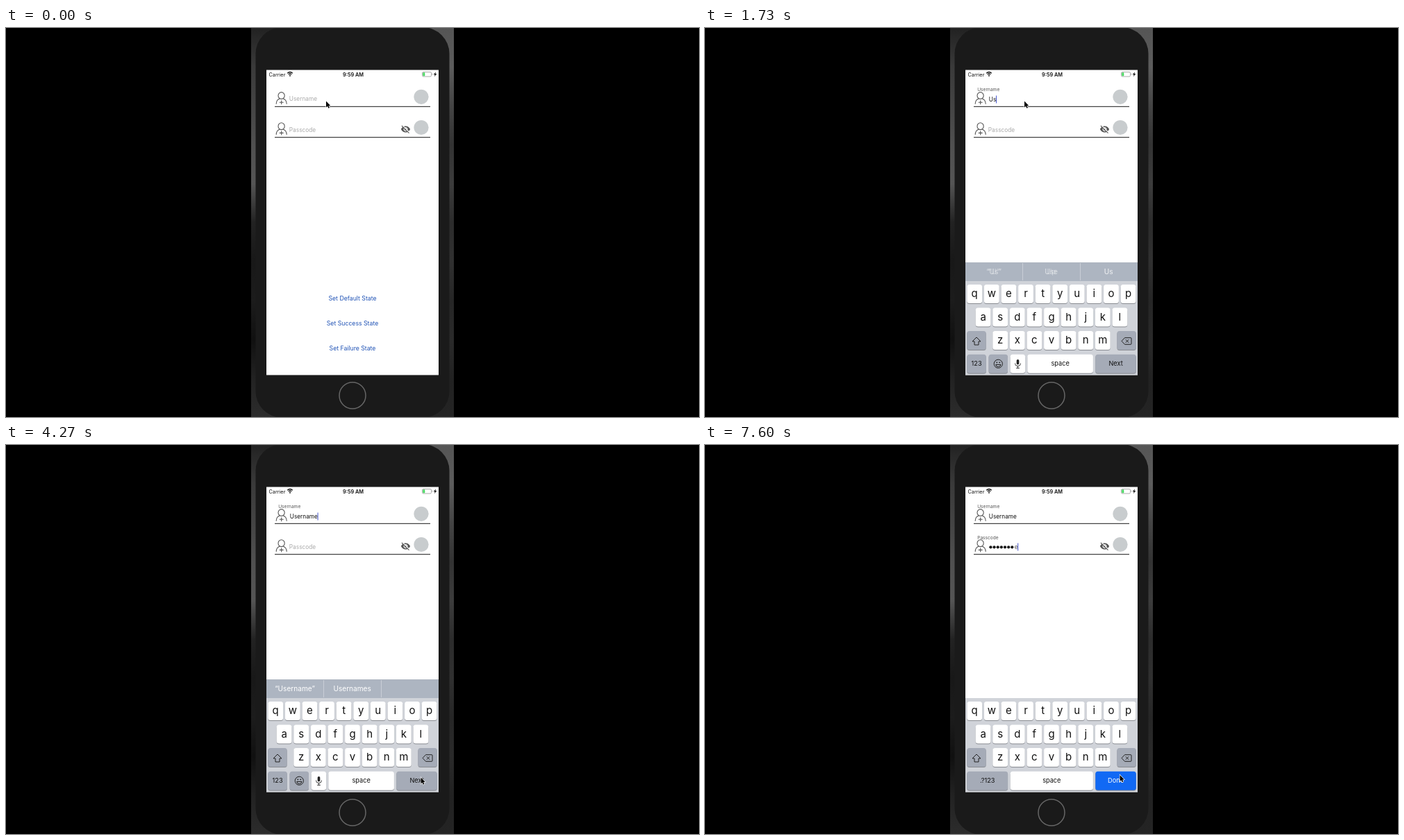
Animation of 998x561 px, one loop 8000 ms. Source, as an HTML page with a canvas:

```html
<!DOCTYPE html>
<html lang="en">
<head>
<meta charset="utf-8">
<title>Login form</title>
<style>
html, body { margin: 0; width: 100%; height: 100%; overflow: hidden; background: #000; }
canvas { display: block; }
</style>
</head>
<body>
<canvas id="stage" width="998" height="561"></canvas>
<script>
const c = document.getElementById('stage').getContext('2d');
const LOOP = 8000, KEYBOARD_IN = 650, PRESS = 4730, SWITCH = 4930;
const USER_TIMES = [1470, 1600, 1870, 2070, 2330, 2600, 2800, 3070];
const PASS_TIMES = [6330, 6400, 6600, 6800, 7200, 7330, 7530, 7600];
const POINTER = [[0, 461, 105.5], [60, 461, 105.5], [70, 460, 105.5], [3230, 460, 105.5],
  [4000, 582, 505], [4100, 597.5, 513], [4270, 597.5, 479.5], [4530, 597.5, 476]];
const HINTS = ['', '“U”,Up,Us', '“Us”,Use,Us', '“Use”,Used,User', '“User”,Users,User’s',
  '“Usern”,Username,Usernames', '“Userna”,Username,Usernames',
  '“Usernam”,Username,Usernames', '“Username”,Usernames,'];
const EYE = new Path2D('M12 7c2.76 0 5 2.24 5 5 0 .65-.13 1.26-.36 1.83l2.92 2.92c1.51-1.26 2.7-2.89 3.43-4.75' +
  '-1.73-4.39-6-7.5-11-7.5-1.4 0-2.74.25-3.98.7l2.16 2.16C10.74 7.13 11.35 7 12 7zM2 4.27l2.74 2.74' +
  'C3.08 8.3 1.78 10.02 1 12c1.73 4.39 6 7.5 11 7.5 1.55 0 3.03-.3 4.38-.84L19.73 22 21 20.73 3.27 3z' +
  'M7.53 9.8l1.55 1.55c-.05.21-.08.43-.08.65 0 1.66 1.34 3 3 3 .22 0 .44-.03.65-.08l1.55 1.55' +
  'c-.67.33-1.41.53-2.2.53-2.76 0-5-2.24-5-5 0-.79.2-1.53.53-2.2zm4.31-.78l3.15 3.15.02-.16c0-1.66-1.34-3-3-3z');
const ARROW = new Path2D('M0 0V9L2 7.2 3.4 10.2 4.9 9.5 3.5 6.7 6.2 6.5Z');

const clamp = v => Math.max(0, Math.min(1, v));
const mix = (a, b, p) => a + (b - a) * p;
const smooth = p => p * p * (3 - 2 * p);
const progress = (t, start, length) => clamp((t - start) / length);
const typed = (t, times) => times.filter(time => t >= time).length;

function rect(x, y, w, h, color, r = 0) {
  c.fillStyle = color;
  c.beginPath();
  c.roundRect(x, y, w, h, r);
  c.fill();
}
function text(s, x, y, size, color, align = 'center', weight = 400) {
  c.font = `${weight} ${size}px Inter, sans-serif`;
  c.fillStyle = color;
  c.textAlign = align;
  c.fillText(s, x, y);
}
function disc(x, y, r, color) {
  c.fillStyle = color;
  c.beginPath();
  c.arc(x, y, r, 0, 7);
  c.fill();
}
function stroke(path, color, width = 1) {
  c.strokeStyle = color;
  c.lineWidth = width;
  c.stroke(new Path2D(path));
}
function fadeBand(x, w, stops) {
  const g = c.createLinearGradient(0, 0, 0, 561);
  stops.forEach((color, i) => g.addColorStop(i / (stops.length - 1), color));
  rect(x, 0, w, 561, g);
}

function drawPhone() {
  rect(0, 0, 998, 561, '#000');
  fadeBand(353, 146, ['#222', '#3a3a3a', '#444', '#505050', '#555', '#222', '#181818', '#1c1c1c', '#101010', '#222', '#2c2c2c']);
  fadeBand(499, 146, ['#555', '#5c5c5c', '#444', '#333', '#3c3c3c', '#2c2c2c', '#303030', '#262626', '#2a2a2a', '#222', '#242424']);
  rect(359.5, -1, 279, 563, '#1a1a1a', 38);
  stroke('M480 530a19 19 0 1 0 38 0a19 19 0 1 0-38 0', '#666', 1.5);
  rect(375, 60.5, 248, 440, '#fff');
}

function drawStatusBar() {
  text('Carrier', 378.5, 69.5, 7.3, '#111', 'left');
  stroke('M405.2 65.2Q409 61.8 412.8 65.2M406.8 67Q409 65 411.2 67', '#111', 1.2);
  disc(409, 68.8, 1, '#111');
  text('9:59 AM', 500, 69.5, 7.3, '#111', 'center', 600);
  stroke('M601 63.5H611Q612.5 63.5 612.5 65V68.5Q612.5 70 611 70H601Q599.5 70 599.5 68.5V65Q599.5 63.5 601 63.5ZM614 65.7V67.8', '#999', .8);
  rect(600.3, 64.3, 3, 5, '#4cd964', .8);
  c.fillStyle = '#111';
  c.fill(new Path2D('M619 63.2L615.8 67.3H617.7L617 70.2L620.3 66H618.3Z'));
}

function drawField(y, name, float) {
  const p = smooth(float);
  text(name, mix(407.8, 392.2, p), y + mix(5.4, -8.7, p), mix(8.3, 6.6, p), p ? '#555' : '#aaa', 'left');
  c.lineCap = 'round';
  stroke(`M392 ${y - 2.5}a4.6 4.9 0 1 0 9.2 0a4.6 4.9 0 1 0-9.2 0M389.2 ${y + 9.2}Q389.5 ${y + 3.5} 394 ${y + 2}` +
    `M399.4 ${y + 2}Q403.8 ${y + 3.5} 404.2 ${y + 9.2}M394.2 ${y + 7.2}h5M396.7 ${y + 4.7}v5`, '#555', 1.1);
  c.lineCap = 'butt';
  rect(387, y + 12.7, 224, 1.4, '#444');
  disc(598, y - .7, 10.6, '#c8ccce');
}

function drawCaret(x, y, t, anchor) {
  const phase = (t - anchor) % 1070;
  c.globalAlpha = 1 - progress(phase, 500, 130) + progress(phase, 930, 140);
  rect(x, y, 1, 11, '#4656d0');
  c.globalAlpha = 1;
}

function drawForm(t) {
  const users = typed(t, USER_TIMES), passes = typed(t, PASS_TIMES);
  drawField(100, 'Username', progress(t, 670, 330));
  drawField(144.2, 'Passcode', progress(t, SWITCH, 330));
  c.save();
  c.translate(568.3, 138.8);
  c.scale(.6, .6);
  c.fillStyle = '#555';
  c.fill(EYE);
  c.restore();

  text('Username'.slice(0, users), 408.8, 106, 8.25, '#111', 'left');
  if (t >= 800 && t < SWITCH) {
    const end = users ? 408.5 + c.measureText('Username'.slice(0, users)).width : 408.8;
    drawCaret(end, 97.5, t, users ? USER_TIMES[users - 1] : 500);
  }
  for (let i = 0; i < passes - 1; i++) disc(411.4 + i * 5.15, 147.3, 2.1, '#111');
  if (passes) text('passcode'[passes - 1], 404.6 + passes * 5.15, 150.3, 8.25, '#555', 'left');
  if (t >= SWITCH + 40) {
    drawCaret(409 + passes * 5.15, 141.5, t, passes ? PASS_TIMES[passes - 1] : SWITCH + 40);
  }
  ['Default', 'Success', 'Failure'].forEach((state, i) =>
    text(`Set ${state} State`, 499, 393.2 + 36 * i, 8.7, '#1f52b5'));
}

function key(x, y, w, label, { fill = '#fff', size = 9.2, color = '#111', drop = 16.5 } = {}) {
  rect(x, y + 1, w, 27, '#898c92', 3.5);
  rect(x, y, w, 27, fill, 3.5);
  text(label, x + w / 2, y + drop, size, color);
}

function drawHints(t) {
  rect(375, 338, 248, 28, '#adb5c1');
  rect(457, 339, 1, 25, '#c8ced7');
  rect(540, 339, 1, 25, '#c8ced7');
  const n = typed(t, USER_TIMES);
  if (!n || t >= SWITCH) return;
  const p = progress(t, USER_TIMES[n - 1] + 40, 150);
  [[n - 1, 1 - p], [n, p]].forEach(([i, alpha]) => {
    c.globalAlpha = alpha;
    HINTS[i].split(',').forEach((word, k) => text(word, 416 + 82.6 * k, 354.7, 10.1, '#fff'));
  });
  c.globalAlpha = 1;
}

function drawKeyboard(t) {
  if (t < KEYBOARD_IN) return;
  const grey = { fill: '#a5abb7' };
  c.save();
  c.beginPath();
  c.rect(375, 60, 248, 440.5);
  c.clip();
  c.translate(0, 163 * Math.exp((KEYBOARD_IN - t) / 43));
  const shrink = 1 - (1 - progress(t, SWITCH, 270)) ** 2;
  if (shrink < 1) {
    c.save();
    c.translate(0, 27 * shrink);
    drawHints(t);
    c.restore();
  }
  rect(375, 365, 248, 136, '#d0d3d9');
  ['qwertyuiop', 'asdfghjkl', 'zxcvbnm'].forEach((row, r) => [...row].forEach((letter, i) =>
    key([377.3, 389.7, 414.3][r] + 24.6 * i, 370 + 33.5 * r, 21.8, letter, { size: 15, drop: 18.4 })));
  key(377.3, 437, 27.4, '', grey);
  stroke('M391 446L397 452H394V457H388V452H385Z', '#222');
  key(593.4, 437, 27.4, '', grey);
  stroke('M604.5 446.7H613Q614 446.7 614 447.7V455.3Q614 456.3 613 456.3H604.5L600 451.5ZM605.8 449.3L610.2 453.7M610.2 449.3L605.8 453.7', '#222');
  if (t < SWITCH) {
    key(377.3, 470.8, 27.6, '123', grey);
    key(408.6, 470.8, 27.4, '', grey);
    stroke('M416.2 484.3a6.1 6.1 0 1 0 12.2 0a6.1 6.1 0 1 0-12.2 0M418.7 485.5H426Q425.5 488.7 422.3 488.7T418.7 485.5Z', '#222');
    disc(420.3, 482.4, .9, '#222');
    disc(424.3, 482.4, .9, '#222');
    key(439.7, 470.8, 21.4, '');
    rect(448.7, 478, 3.6, 7.5, '#222', 1.8);
    stroke('M446.7 483.5V484.5Q446.7 487.5 450.5 487.5T454.3 484.5V483.5M450.5 487.5V490.5M448.2 490.5H452.8', '#222', .9);
    key(464.3, 470.8, 94.6, 'space');
    key(562.3, 470.8, 58.5, 'Next', t < PRESS ? grey : {});
  } else {
    key(377.3, 470.8, 58.8, '.?123', grey);
    key(439.7, 470.8, 119.2, 'space');
    key(562.3, 470.8, 58.5, 'Done', { fill: '#1169f4', color: '#fff' });
  }
  c.restore();
}

function drawPointer(t) {
  let i = POINTER.findLastIndex(k => t >= k[0]);
  const from = POINTER[i], to = POINTER[i + 1] || from;
  const p = smooth(progress(t, from[0], to[0] - from[0] || 1));
  c.save();
  c.translate(mix(from[1], to[1], p), mix(from[2], to[2], p));
  c.strokeStyle = '#fff';
  c.lineWidth = 1.2;
  c.stroke(ARROW);
  c.fillStyle = '#000';
  c.fill(ARROW);
  c.restore();
}

function frame() {
  const t = performance.now() % LOOP;
  drawPhone();
  drawStatusBar();
  drawForm(t);
  drawKeyboard(t);
  drawPointer(t);
  requestAnimationFrame(frame);
}
frame();
</script>
</body>
</html>
```
